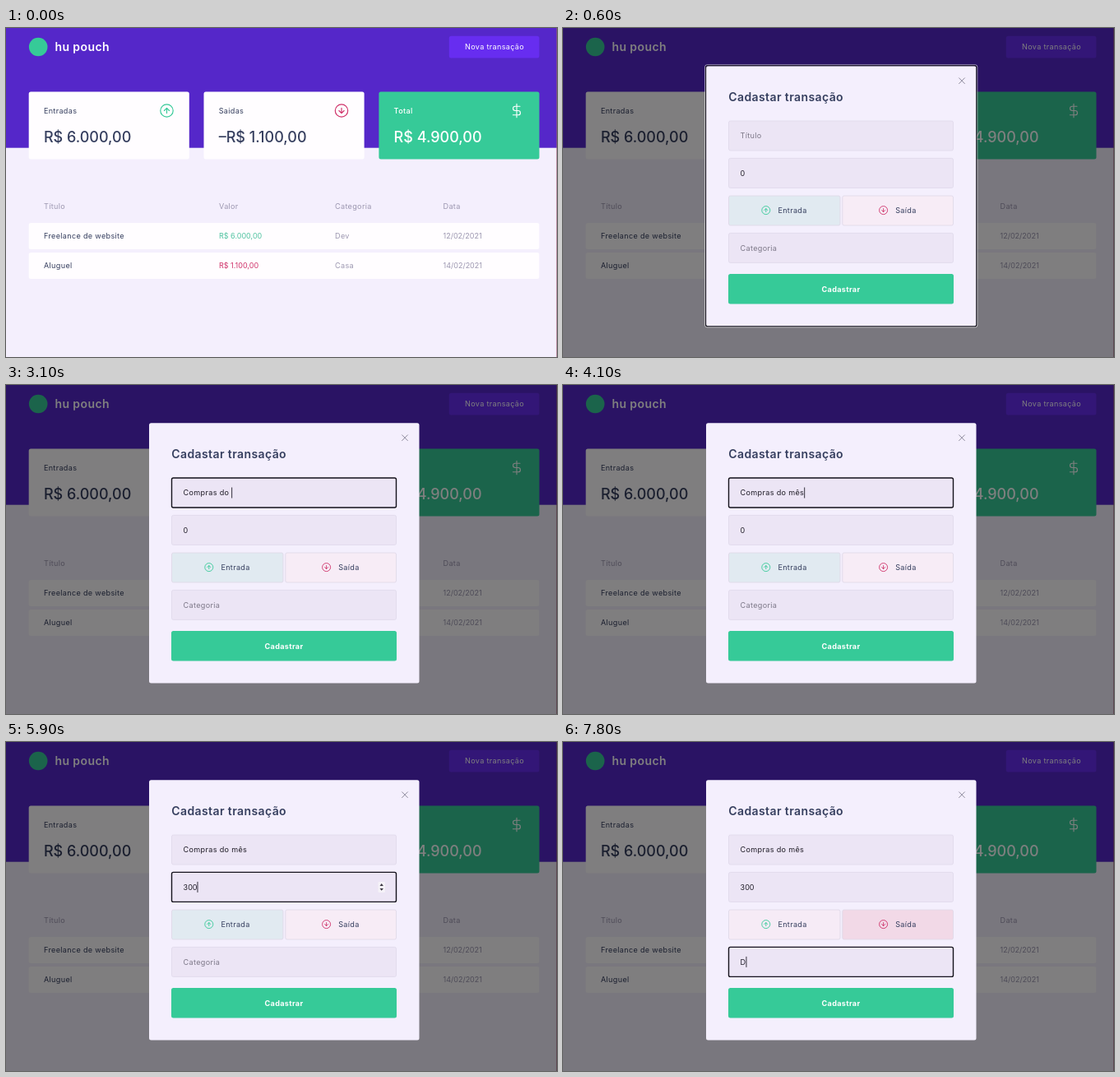
An HTML page for the animation above (8000 ms loop, 670 px wide and 400 px high).

```html
<!DOCTYPE html>
<html lang="pt">
<head>
<meta charset="utf-8">
<style>
  html, body { margin: 0; width: 100%; height: 100%; overflow: hidden; background: #f4effd; }
  svg { display: block; width: 670px; height: 400px; }
  text { font: 400 9.1px Inter, "Open Sans", sans-serif; letter-spacing: .32px; white-space: pre; }
  .num { font-size: 9px; letter-spacing: 0; }
  .big { font-size: 18px; font-weight: 500; letter-spacing: 0; }
  .title { font-size: 14px; font-weight: 600; letter-spacing: .4px; }
  .bold { font-weight: 700; }
  .medium { font-weight: 500; }
</style>
</head>
<body>
<svg viewBox="0 0 670 400"><g id="page"></g><g id="live"></g></svg>
<script>
const LOOP = 8000, STEP = 100;
const GREEN = '#36ca98', RED = '#cf3169', INK = '#363f5f', MUTED = '#9c97b0', WHITE = '#fffdff';
const page = document.getElementById('page'), live = document.getElementById('live');

const rect = (x, y, w, h, fill, r = 2.5, more = '') =>
  `<rect x="${x}" y="${y}" width="${w}" height="${h}" rx="${r}" fill="${fill}" ${more}/>`;
const text = (x, y, label, fill, cls = '', more = '') =>
  `<text x="${x}" y="${y}" fill="${fill}" class="${cls}" ${more}>${label}</text>`;
const centered = 'text-anchor="middle"';
const path = (d, color, width = 1.2) =>
  `<path d="${d}" fill="none" stroke="${color}" stroke-width="${width}" stroke-linecap="round" stroke-linejoin="round"/>`;

// Circled arrow; dir is -1 for up, 1 for down
const arrow = (x, y, r, dir, color) => {
  const a = r * .4, width = r * .1 + .4;
  return `<g transform="translate(${x} ${y})">
    <circle r="${r}" fill="none" stroke="${color}" stroke-width="${width}"/>` +
    path(`M0 ${-a * dir}V${a * dir}M${-a} 0L0 ${a * dir}L${a} 0`, color, width) + '</g>';
};

const ring = ([x, y, w, h], halo) =>
  (halo ? rect(x - 1, y - 1, w + 2, h + 2, 'none', 2.5, 'stroke="#fff" stroke-width=".6"') : '') +
  rect(x, y, w, h, 'none', 2, `stroke="#15131c" stroke-width="${halo ? 1.1 : 1.4}"`);

function drawPage() {
  const card = (x, fill, ink, label, amount) =>
    rect(x, 77.6, 195.1, 82, fill) +
    text(x + 18.2, 103.5, label, ink, ink === INK ? '' : 'medium') +
    text(x + 18.2, 138.6, amount, ink, 'big');
  const row = (y, cells, colors) =>
    [46, 259, 400, 531.5].map((x, i) => text(x, y, cells[i], colors[i], /\d/.test(cells[i]) ? 'num' : '')).join('');

  page.innerHTML =
    rect(0, 0, 670, 400, '#f4effd', 0) +
    rect(0, 0, 670, 145.7, '#5527c9', 0) +
    `<circle cx="39.2" cy="23" r="11.3" fill="${GREEN}"/>` +
    text(59.5, 28, 'hu pouch', '#fff', 'title') +
    card(27.7, WHITE, INK, 'Entradas', 'R$ 6.000,00') +
    card(240.5, WHITE, INK, 'Saidas', '–R$ 1.100,00') +
    card(453.4, GREEN, '#fff', 'Total', 'R$ 4.900,00') +
    arrow(195.5, 100.5, 7.7, -1, GREEN) +
    arrow(408, 100.5, 7.7, 1, RED) +
    path('M621 92.2V108.8M625 95.2H619.2A2.65 2.65 0 0 0 619.2 100.5H622.8A2.65 2.65 0 0 1 622.8 105.8H616.4', '#fff', 1.1) +
    row(219.6, ['Título', 'Valor', 'Categoria', 'Data'], Array(4).fill(MUTED)) +
    rect(27.7, 237, 620.7, 32, WHITE) +
    rect(27.7, 273, 620.7, 32, WHITE) +
    row(256, ['Freelance de website', 'R$ 6.000,00', 'Dev', '12/02/2021'], [INK, '#4fc3a0', MUTED, MUTED]) +
    row(292.3, ['Aluguel', 'R$ 1.100,00', 'Casa', '14/02/2021'], [INK, RED, MUTED, MUTED]) +
    rect(669, 0, 1, 400, '#9a5670', 0, 'opacity=".6"');
}

const boxes = {
  open: [539, 10, 109.8, 26.8],
  dialog: [173.6, 45.8, 329.2, 317],
  close: [479.5, 57.5, 11, 13],
  title: [201.5, 113, 273, 36],
  value: [201.5, 158.4, 273, 36],
  income: [201.5, 204, 135.5, 36],
  expense: [339.8, 204, 134.7, 36],
  category: [201.5, 249.4, 273, 36]
};

const focusChanges = [[300, 'open'], [600, 'dialog'], [1200, 'close'], [1300, 'title'],
  [4400, 'value'], [6600, 'income'], [6700, 'expense'], [7000, 'category']];

const typing = {
  title: [...[...'Compras do '].map((c, i, all) => [1700 + i * 140, all.slice(0, i + 1).join('')]),
    [3150, 'Compras do m'], [3800, 'Compras do m^'], [3900, 'Compras do mê'], [4050, 'Compras do mês']],
  value: [[0, '0'], [5200, '3'], [5300, '30'], [5500, '300']],
  category: [[7700, 'D']]
};

const latest = (list, t) => list.filter(([at]) => at <= t).pop() || [0, ''];

function field(name, placeholder, t, focus, focusedAt) {
  const [x, y, w, h] = boxes[name];
  const [typedAt, value] = latest(typing[name], t);
  const focused = focus === name;
  const selected = focused && name === 'value' && value === '0';
  const caretOn = focused && !selected && (t - Math.max(typedAt, focusedAt)) % 1000 < 450;
  return rect(x, y, w, h, '#ece5f5', 2, 'stroke="#dfd8ea" stroke-width=".8"') +
    (selected ? rect(215.3, y + 11, 6.4, 14, '#3a86ee', 0) : '') +
    text(215.6, y + 21.2, value || placeholder, selected ? '#fff' : value ? '#201d28' : '#7d7888',
      name === 'value' ? 'num' : '', `id="${name}"`) +
    (focused && name === 'value'
      ? rect(452.5, y + 11.5, 8.5, 13, '#f5f2f8', 1) +
        `<path d="M454.5 ${y + 16.5}l2.2 -2.8l2.2 2.8zM454.5 ${y + 19.5}l2.2 2.8l2.2 -2.8z" fill="#3b3742"/>`
      : '') +
    (caretOn ? rect(216, y + 11.5, .9, 13, '#201d28', 0, `data-after="${value ? name : ''}"`) : '');
}

function choice(name, label, fill, dir, color, iconX) {
  const [x, y, w, h] = boxes[name];
  return rect(x, y, w, h, fill, 2, 'stroke="#ddd7e6" stroke-width=".8"') +
    arrow(iconX, 221.6, 5, dir, color) +
    text(iconX + 14.6, 225.1, label, INK);
}

function dialog(t, focus, focusedAt) {
  const spent = t >= 6800;
  return rect(0, 0, 670, 400, '#000', 0, 'opacity=".5"') +
    rect(174, 46.2, 328.5, 316.3, '#f4effd') +
    path('M481.6 60.8l6.8 6.8m0 -6.8l-6.8 6.8', '#8d8a9c', 1) +
    text(201.3, 88.8, 'Cadastar transação', INK, 'title') +
    field('title', 'Título', t, focus, focusedAt) +
    field('value', 'Valor', t, focus, focusedAt) +
    choice('income', 'Entrada', spent ? '#f6ebf6' : '#e1eaf1', -1, GREEN, 246.8) +
    choice('expense', 'Saída', spent ? '#f2d9e7' : '#f7ecf6', 1, RED, 389.6) +
    field('category', 'Categoria', t, focus, focusedAt) +
    rect(201, 299, 274, 36.4, GREEN) +
    text(338, 320.5, 'Cadastrar', '#fff', 'bold', centered);
}

function draw(t) {
  const [focusedAt, focus] = latest(focusChanges, t);
  live.innerHTML =
    rect(538.8, 9.8, 109.6, 26.6, t >= 100 && t < 600 ? '#612ae2' : '#672df0') +
    text(594, 26.4, 'Nova transação', '#fff', '', centered) +
    (t >= 600 ? dialog(t, focus, focusedAt) : '') +
    (focus ? ring(boxes[focus], focus === 'open' || focus === 'dialog') : '');

  const caret = live.querySelector('[data-after]');
  if (caret && caret.dataset.after) {
    const typed = document.getElementById(caret.dataset.after);
    caret.setAttribute('x', 215.6 + typed.getComputedTextLength());
  }
}

drawPage();
let shown = -1;
function tick() {
  const t = Math.floor(performance.now() % LOOP / STEP) * STEP;
  if (t !== shown) draw(shown = t);
  requestAnimationFrame(tick);
}
tick();
</script>
</body>
</html>
```
